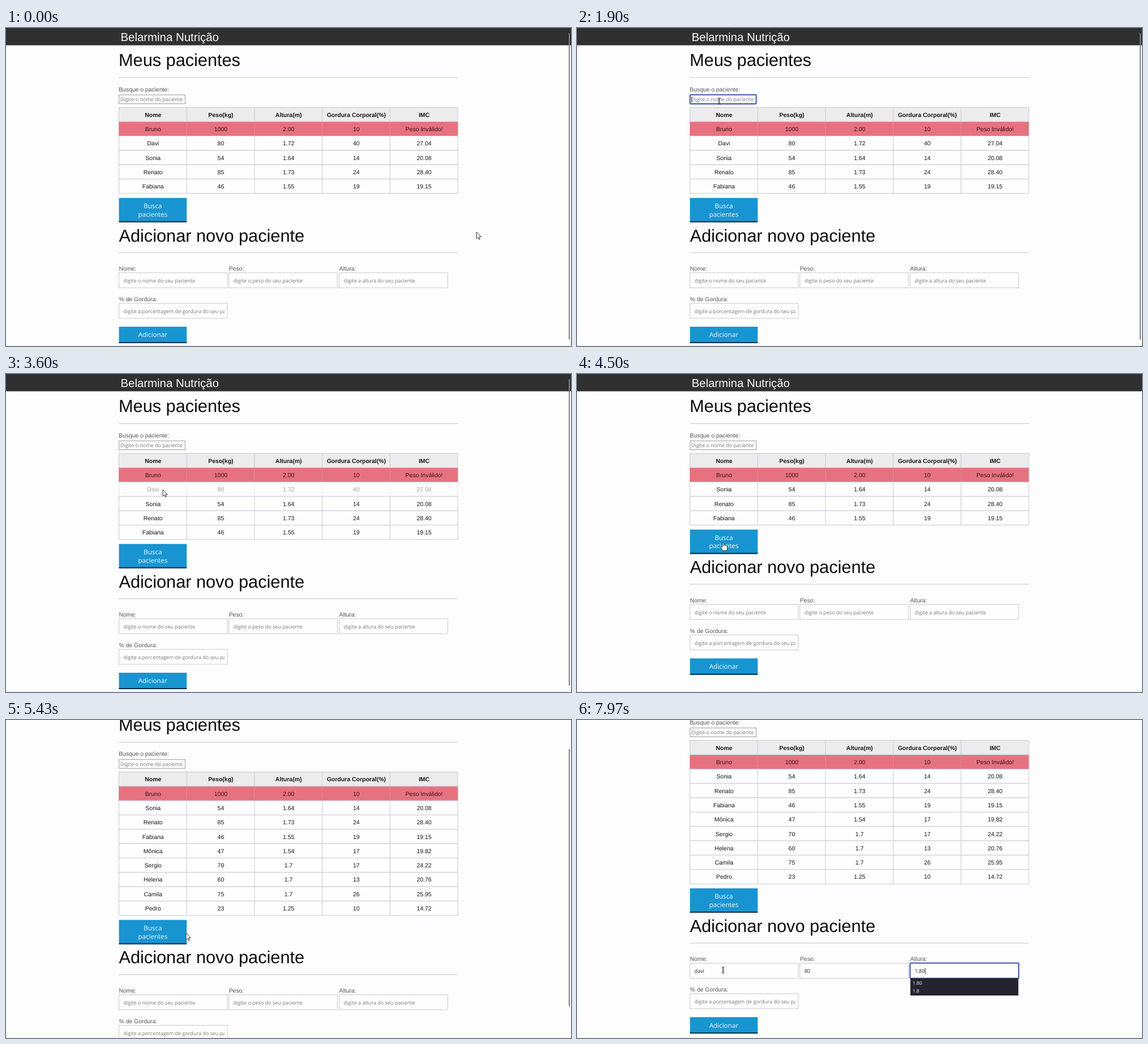
An HTML page for the animation above (8 s loop, 998 by 561 pixels).

```html
<!DOCTYPE html>
<html lang="pt-BR">
<head>
<meta charset="utf-8">
<title>Pacientes</title>
<style>
  html, body { margin: 0; width: 100%; height: 100%; overflow: hidden; background: #fdfdfd; }
  svg { display: block; width: 100%; height: 100%; }
  text { font-family: "Liberation Sans", Arial, sans-serif; text-rendering: geometricPrecision; white-space: pre; }
  .ui { font-family: "Open Sans", "Noto Sans", sans-serif; }
</style>
</head>
<body>
<svg id="stage" viewBox="0 0 998 561" preserveAspectRatio="none"></svg>
<script>
const LOOP = 8000;
const ROW = 25.3, TOP = 140, LEFT = 199.5, WIDTH = 598.5, COL = WIDTH / 5;
const FADE = 3300, REMOVED = 3800, LOADED = 4850;
const LINE = '#c8c8d4';

const head = ['Nome', 'Peso(kg)', 'Altura(m)', 'Gordura Corporal(%)', 'IMC'];
const invalid = 'Bruno 1000 2.00 10'.split(' ').concat('Peso Inválido!');
const removed = 'Davi 80 1.72 40 27.04'.split(' ');
const kept = ['Sonia 54 1.64 14 20.08', 'Renato 85 1.73 24 28.40', 'Fabiana 46 1.55 19 19.15']
  .map(r => r.split(' '));
const loaded = ['Mônica 47 1.54 17 19.82', 'Sergio 70 1.7 17 24.22', 'Helena 60 1.7 13 20.76',
  'Camila 75 1.7 26 25.95', 'Pedro 23 1.25 10 14.72'].map(r => r.split(' '));

const fields = [
  { x: 199.5, label: 'Nome:', hint: 'digite o nome do seu paciente', focus: [5790, 6650],
    keys: [6010, 6110, 6220, 6330], value: 'davi', list: ['davi', 'Davi'] },
  { x: 393.7, label: 'Peso:', hint: 'digite o peso do seu paciente', focus: [6650, 7300],
    keys: [6900, 7050], value: '80', list: ['80'] },
  { x: 588.5, label: 'Altura:', hint: 'digite a altura do seu paciente', focus: [7300, LOOP],
    keys: [7480, 7620, 7740, 7860], value: '1.80', list: ['1.80', '1.8'] }
];

// time, x, y, shape
const path = [
  [0, 831, 360, 'arrow'], [600, 831, 360, 'arrow'], [1500, 251, 129, 'beam'],
  [2720, 251, 129, 'arrow'], [3120, 277, 204, 'arrow'], [3900, 277, 204, 'arrow'],
  [4280, 258, 297, 'hand'], [5000, 258, 297, 'arrow'], [5380, 318, 376, 'arrow'],
  [5480, 318, 376, 'arrow'], [5720, 258, 441, 'beam']
];

const clamp = v => Math.max(0, Math.min(1, v));
const ease = v => v * v * (3 - 2 * v);
const ramp = (t, a, b) => clamp((t - a) / (b - a));

const rect = (x, y, w, h, fill, more = '') =>
  `<rect x="${x}" y="${y}" width="${w}" height="${h}" fill="${fill}" ${more}/>`;
const box = (x, y, w, h, stroke) => rect(x, y, w, h, '#fefefe', `stroke="${stroke}"`);
const line = (x1, y1, x2, y2, c = LINE) => `<path d="M${x1} ${y1}L${x2} ${y2}" stroke="${c}"/>`;
const text = (s, x, y, size, fill, more = '') =>
  `<text x="${x}" y="${y}" font-size="${size}" fill="${fill}" ${more}>${s}</text>`;
const ui = (s, x, y, size, fill, more = '') => text(s, x, y, size, fill, 'class="ui" ' + more);
const MID = 'text-anchor="middle"';

function textWidth(s, size) {
  const c = textWidth.ctx ||= document.createElement('canvas').getContext('2d');
  c.font = `${size}px "Open Sans", "Noto Sans", sans-serif`;
  return c.measureText(s).width;
}

function focusRing(x, y, w, h) {
  return rect(x - 1.2, y - 1.2, w + 2.4, h + 2.4, 'none', 'rx="2" stroke="#bccbec" stroke-width="1.6"') +
    rect(x, y, w, h, '#fefefe', 'rx="1" stroke="#30479a" stroke-width="1.6"');
}

const caret = (x, y, age) => age % 1000 < 500 ? rect(x, y - 8.5, 0.9, 11, '#222') : '';

function tableRow(cells, i, kind, opacity = 1) {
  const y = TOP + i * ROW;
  const bg = kind === 'head' ? '#ececec' : kind === 'bad' ? '#e6727f' : '#fefefe';
  const edge = kind === 'bad' ? '#d98f95' : LINE;
  let s = rect(LEFT, y, WIDTH, ROW, bg) + line(LEFT, y, LEFT + WIDTH, y) +
    line(LEFT, y + ROW, LEFT + WIDTH, y + ROW);
  for (let c = 0; c < 6; c++) s += line(LEFT + c * COL, y, LEFT + c * COL, y + ROW, edge);
  cells.forEach((v, c) => s += text(v, LEFT + (c + 0.5) * COL + 0.4, y + 16.7, 10.5,
    kind === 'bad' ? '#3a1418' : '#161616', MID + (kind === 'head' ? ' font-weight="bold"' : '')));
  return `<g opacity="${opacity}">${s}</g>`;
}

function button(y, h, lines) {
  return rect(LEFT, y, 119.7, h, '#1895d1') + rect(LEFT, y + h - 2, 119.7, 2, '#0b2e45') +
    lines.map((s, i) => ui(s, 259.3, y + 18.3 + i * 14.6, 11.6, '#f2f9fd', MID)).join('');
}

function field(f, t, y) {
  const [on, off] = f.focus;
  const focused = t >= on && t < off;
  const typed = f.keys.filter(k => t >= k).length;
  const value = f.value.slice(0, typed);
  const tx = f.x + 8, ty = y + 17.2;
  let s = text(f.label, f.x, y - 3.6, 10.4, '#555');
  s += focused ? focusRing(f.x, y, 191.5, 26.5) : box(f.x, y, 191.5, 26.5, LINE);
  s += ui(value || f.hint, tx, ty, 9, value ? '#222' : '#777');
  if (focused) s += caret(tx + textWidth(value, 9) + 0.3, ty, t - (typed ? f.keys[typed - 1] : on));
  return s;
}

function suggestions(f, t, y) {
  if (t < f.keys[0] || t >= f.focus[1]) return '';
  return rect(f.x + 0.3, y + 26.8, 190.8, 1 + f.list.length * 14.6, '#25232d') +
    f.list.map((s, i) => ui(s, f.x + 4.3, y + 37.6 + i * 14.6, 8.4, '#f4f4f6')).join('');
}

function cursor(t) {
  let i = path.length - 1;
  while (path[i][0] > t) i--;
  const a = path[i], b = path[i + 1] || a;
  const k = b === a ? 0 : ease(ramp(t, a[0], b[0]));
  const x = a[1] + (b[1] - a[1]) * k, y = a[2] + (b[2] - a[2]) * k;
  const shapes = {
    arrow: '<path d="M0 0V11.6L2.7 9.2L4.5 13.2L6.3 12.4L4.6 8.5H8.2Z" fill="#fff" stroke="#333"/>',
    beam: '<path d="M-2.5 -5.5Q0 -5.5 0 -4V4Q0 5.5 -2.5 5.5M2.5 -5.5Q0 -5.5 0 -4V4Q0 5.5 2.5 5.5" fill="none" stroke="#333"/>',
    hand: '<path d="M-1.2 1Q0 -.8 1.2 1V5.5Q2.6 4.4 3.6 5.8Q5 5 5.8 6.3Q7.6 5.8 7.7 7.6V10.8L6.3 14.8H-.3L-4 9.5Q-4.2 7.4 -2.4 8L-1.2 9.2Z" fill="#fff" stroke="#222"/>'
  };
  return `<g transform="translate(${x.toFixed(2)} ${y.toFixed(2)})">${shapes[a[3]]}</g>`;
}

function scrollbar(t, scroll) {
  if (t >= REMOVED && t < LOADED) return '';
  const y = t < LOADED ? 9 : 10.7 + scroll * 0.84;
  const h = t < LOADED ? 541 : 454;
  return rect(994, y, 2, h, '#808084', `rx="1" opacity="${1 - ramp(t, 7000, 7250)}"`);
}

function scene(t) {
  const scroll = 104 * ramp(t, 5150, 5755);
  let rows = [invalid];
  if (t < REMOVED) rows.push(removed);
  rows = rows.concat(kept, t >= LOADED ? loaded : []);
  const end = TOP + (rows.length + 1) * ROW;
  const inputs = end + 140;

  let s = rect(0, 0, 998, 30.5, '#303030') + text('Belarmina Nutrição', 202.5, 22.6, 20.4, '#fafafa');
  s += text('Meus pacientes', 199, 67, 30.7, '#0c0c0c') + line(LEFT, 87.5, 798, 87.5);
  s += text('Busque o paciente:', 199, 111.7, 10.4, '#555');
  const searching = t >= 1700 && t < 3200;
  s += searching ? focusRing(199.8, 118, 116.6, 15.6) : box(199.8, 118, 116.6, 15.6, '#999');
  s += ui('Digite o nome do paciente', 201.8, 129.2, 9, '#777');
  if (searching) s += caret(202.3, 129.2, t - 1700);

  s += tableRow(head, 0, 'head');
  rows.forEach((r, i) => s += tableRow(r, i + 1, r === invalid ? 'bad' : '',
    r === removed ? 1 - ramp(t, FADE, REMOVED) : 1));

  s += button(end + 8, 43, ['Busca', 'pacientes']);
  s += text('Adicionar novo paciente', 199.5, end + 84.8, 30.7, '#0c0c0c');
  s += line(LEFT, end + 104.6, 798, end + 104.6);
  s += text('% de Gordura:', 199.5, end + 190.4, 10.4, '#555');
  s += box(LEFT, end + 194, 191.5, 26.3, LINE);
  s += `<svg x="200" y="${end + 194}" width="186" height="27">` +
    ui('digite a porcentagem de gordura do seu paciente', 7.5, 17.2, 9, '#777') + '</svg>';
  s += button(end + 235.2, 29, ['Adicionar']);
  fields.forEach(f => s += field(f, t, inputs));
  fields.forEach(f => s += suggestions(f, t, inputs));

  return rect(0, 0, 998, 561, '#fdfdfd') + `<g transform="translate(0 ${-scroll})">${s}</g>` +
    rect(0, 559.5, 998, 1.5, '#f3f5df') + scrollbar(t, scroll) + cursor(t);
}

const stage = document.getElementById('stage');
let shown = '';
function draw() {
  const next = scene(performance.now() % LOOP);
  if (next !== shown) stage.innerHTML = shown = next;
  requestAnimationFrame(draw);
}
draw();
</script>
</body>
</html>
```
